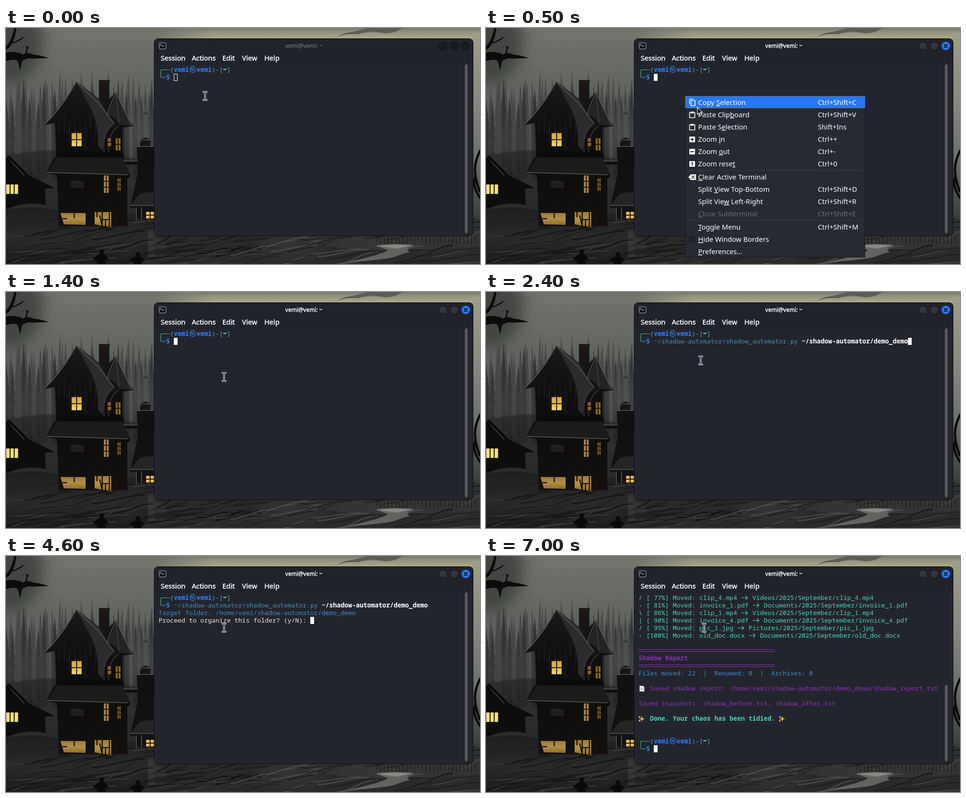
An HTML page that plays this animation: 1000x500 px, repeating every 8 s.

```html
<!DOCTYPE html>
<html lang="en">
<head>
<meta charset="utf-8">
<title>Terminal session</title>
<style>
  html, body { margin: 0; width: 100%; height: 100%; overflow: hidden; background: #222; }
  svg { display: block; width: 1000px; height: 500px; }
  text { white-space: pre; fill: #fff; font: 500 14.67px "Noto Sans", sans-serif; }
  .title { font-size: 12px; text-anchor: middle; }
  .active { stroke: #fff; stroke-width: .4px; }
  .mono { font: 13.333px "Noto Sans Mono", monospace; }
  .bold { font-weight: 700; }
  .teal { fill: #3fb8a0; }
  .mint { fill: #47d4b9; }
  .blue { fill: #277fff; }
  .sky { fill: #3a8fd0; }
  .cmd { fill: #4193b5; }
  .violet { fill: #962ac3; }
  .cream { fill: #eeeade; }
  .off { fill: #6c6e74; }
  .under { text-decoration: underline; }
</style>
</head>
<body>
<svg id="stage" viewBox="0 0 1000 500"></svg>
<script>
const NAME = 'vemi', LOOP = 8000;
const stage = document.getElementById('stage');

let seed = 7;
const rand = (a, b) => {
  seed = (seed * 16807) % 2147483647;
  return a + (b - a) * seed / 2147483647;
};
const repeat = (n, fn) => Array.from({ length: n }, (_, i) => fn(i)).join('');
const rect = (x, y, w, h, fill, extra = '') =>
  `<rect x="${x}" y="${y}" width="${w}" height="${h}" fill="${fill}" ${extra}/>`;
const path = (d, fill, extra = '') => `<path d="${d}" fill="${fill}" ${extra}/>`;
const line = (d, color, width = 1) =>
  path(d, 'none', `stroke="${color}" stroke-width="${width}" stroke-linecap="round"`);
const glow = (x, y, rx, ry, color) =>
  `<ellipse cx="${x}" cy="${y}" rx="${rx}" ry="${ry}" fill="${color}" filter="url(#blur)"/>`;
const label = (x, y, text, cls = '') => `<text x="${x}" y="${y}" class="${cls}">${text}</text>`;
const layer = (from, to, html) => `<g data-from="${from}" data-to="${to}">${html}</g>`;

// ---- Wallpaper ----
const gradient = (id, ...colors) => `<linearGradient id="${id}" x2="0" y2="1">${
  colors.map((c, i) => `<stop offset="${i / (colors.length - 1)}" stop-color="${c}"/>`).join('')}</linearGradient>`;

function pine(x, top, width) {
  let left = '', right = '';
  for (let i = 1; i < 9; i++) {
    const y = top + i * 11, w = width * i / 8;
    right += `L${x + w * rand(.7, 1.1)} ${y}L${x + w * .6} ${y - 2}`;
    left = `L${x - w * .6} ${y - 2}L${x - w * rand(.7, 1.1)} ${y}` + left;
  }
  return `M${x} ${top}${right}V320H${x - width / 2}${left}Z`;
}
const forest = (n, step, low, high, width, fill) =>
  repeat(n, i => path(pine(i * step + rand(-5, 5), rand(low, high), rand(width * .6, width)), fill));

function pane(x, y, w, h, fill = 'url(#lamp)', cols = 2, rows = 2) {
  let bars = '';
  for (let i = 1; i < cols; i++) bars += `M${x + w * i / cols} ${y}v${h}`;
  for (let i = 1; i < rows; i++) bars += `M${x} ${y + h * i / rows}h${w}`;
  return rect(x, y, w, h, fill, 'stroke="#100e0c"') + line(bars, '#17120c', 2);
}

const figure = (x, y) =>
  `<circle cx="${x}" cy="${y}" r="5" fill="#090909"/>` +
  path(`M${x - 4} ${y + 4}Q${x - 12} ${y + 8} ${x - 18} 490L${x - 15} 493L${x - 9} ${y + 17}L${x - 11} 500H${x + 9}` +
       `L${x + 8} ${y + 15}L${x + 12} 494L${x + 14} 491Q${x + 11} ${y + 7} ${x + 4} ${y + 4}Z`, '#090909');

// Long thin roots and grass sweeping up to the right
const roots = (n, x0, x1, colors) => repeat(n, i => {
  const x = rand(x0, x1), y = rand(415, 505), w = rand(40, 120), rise = rand(4, 26);
  return line(`M${x} ${y}C${x + w * .4} ${y - 2} ${x + w * .6} ${y - rise} ${x + w} ${y - rise}`,
    colors[i % colors.length], rand(.6, 2.6));
});

const wallpaper = `<defs>
  ${gradient('air', '#72746d', '#666963', '#545754', '#434645', '#303333', '#272929')}
  ${gradient('far', '#474a47', '#444745', '#353837')}
  ${gradient('near', '#343736', '#313433', '#2a2c2c')}
  ${gradient('soil', '#1d1e1e', '#282929', '#1d1e1e')}
  ${gradient('wood', '#191817', '#0d0c0c', '#121110')}
  ${gradient('lamp', '#d6a52f', '#ffd855')}
  ${gradient('dusk', '#a17a35', '#b98f42', '#8f6a2e')}
  ${gradient('edge', '#a19d86', '#888a81', '#6d6f6a', '#373938')}
  ${gradient('dawn', '#7c7d70', '#99987f', '#b0ab8c')}
  <filter id="blur" x="-1" y="-1" width="3" height="3"><feGaussianBlur stdDeviation="16"/></filter>
  <linearGradient id="veil"><stop stop-color="#6f716a"/><stop offset="1" stop-color="#6f716a" stop-opacity="0"/></linearGradient>
</defs>
${rect(0, 0, 1000, 500, 'url(#air)')}
${rect(300, 0, 700, 24, 'url(#dawn)')}
${rect(300, 0, 140, 24, 'url(#veil)')}
${glow(0, 30, 80, 90, '#3a3d3acc')}
${path('M690 22Q715 11 742 13Q765 5 800 11Q820 12 836 0H760Q745 6 715 11Z', '#5b5d56')}
${rect(984, 10, 16, 400, 'url(#edge)')}
${forest(32, 10, 82, 130, 9, 'url(#far)')}
${forest(20, 17, 105, 165, 12, 'url(#near)')}
${glow(285, 225, 30, 45, '#62656277')}
${glow(55, 240, 50, 35, '#4a4d4c66')}
${path('M0 270Q160 240 320 290V440H0Z', '#222424', 'opacity=".6"')}
${path('M0 52Q20 48 38 57Q46 50 56 56Q72 57 90 64Q70 64 56 65Q44 62 34 70Q33 80 29 90Q28 74 22 68Q12 66 0 70Z', '#0b0b0b')}
${path('M0 38Q12 28 17 0H22Q20 24 8 40L0 47Z', '#0b0b0b')}
${line('M10 32Q24 30 36 20M40 56Q46 48 44 40L47 42', '#0b0b0b', 2.5)}
${path('M290 181l4-2 7 2-5 3Z', '#343734')}
${path('M0 386Q60 371 120 390T250 398Q290 385 330 400V500H0Z', 'url(#soil)')}
${rect(300, 430, 700, 70, '#343534')}
${path('M312 440H620Q670 470 790 470T1000 463V500H250Q390 470 312 440Z', '#292a29')}
${glow(600, 465, 70, 14, '#4a4b4888')}
${roots(110, -40, 480, ['#151616', '#383a39', '#1a1b1b', '#111212'])}
${roots(70, 380, 1000, ['#1b1c1b', '#4b4c49', '#222322'])}
${path('M778 461Q815 456 862 461Q838 467 852 474Q830 481 812 487Q770 494 715 497Q785 482 806 471Q792 465 778 461Z', '#62635f')}
${path('M782 461Q820 456 860 460L829 467Q800 466 782 461Z', '#85867f')}
${line(repeat(27, i => `M${782 + i * 8} ${rand(439, 444)}v${rand(12, 18)}`), '#1b1c1b', 1.4)}
${line('M1000 260Q984 292 992 322T1000 345M990 315Q982 333 1000 360', '#0b0b0b', 5)}

${path('M0 276L8 268L48 307L105 339L82 341L84 375Q40 366 0 384Z', '#0e0d0d')}
${line('M8 269L50 311L103 338M10 282L38 312', '#4b4b47', 1.3)}
${pane(0, 331, 26, 21, '#ffe07a', 3, 1)}
${path('M148 113L196 150V112H218V151L232 135Q247 180 270 208L249 211L249 282H277V289H249L263 314L256 319V420H112L107 311L84 307L99 279L106 272L103 201L80 206Q122 164 148 113Z', 'url(#wood)')}
${rect(196, 110, 23, 6, '#1e1e1c')}
${path('M148 113L196 150L218 190L230 204Q206 215 204 260L194 250Q196 207 180 172Z', '#2b2b29')}
${path('M232 137Q247 180 268 207L240 205Q226 185 213 184Q226 160 232 137Z', '#232321')}
${path('M106 274H246L262 310L86 306Z', '#1c1b1a')}
${line('M148 114Q122 164 82 204M148 114L196 160L228 202M232 137Q219 163 213 184M232 137L265 207M86 306L256 311', '#5b5b55', 1.4)}
${line('M232 142L239 201M221 206Q203 228 207 263M235 208Q213 231 217 262M247 211V265', '#494842', 1.2)}
${line(repeat(8, i => `M${112 + i * 11} ${rand(175, 200)}v${rand(25, 70)}`), '#22201e', 1.5)}
${pane(138, 222, 22, 29)}
${pane(214, 233, 8, 18, '#87622c', 1)}
${pane(231, 233, 11, 27, '#8f672c')}
${pane(206, 312, 11, 38, '#b58d40', 2, 3)}
${pane(235, 318, 7, 27, '#a87c30', 2, 3)}
${rect(138, 325, 25, 12, '#211e1b', 'stroke="#33302b"')}
${path('M115 392H168V417L122 416Z', 'url(#dusk)')}
${path('M187 390H222V422L187 416Z', 'url(#dusk)')}
${line('M144 390v12M116 404h12M192 390v10M198 398l4 17M203 391v30M210 407v14M218 392v28M204 406h14', '#1b150d', 2.6)}
${path('M276 251H283V241H304V250H320V305L278 312Z', '#111010')}
${path('M284 235L295 232L306 237L304 248H286Z', '#171716')}
${line('M284 236L306 238M277 251H312M249 282H278', '#5d5d57', 1.6)}
${path('M278 308L318 286V405H274V381H261Z', '#121211')}
${path('M261 376L284 350L320 346V378Z', '#252523')}
${line('M262 376H312M275 382V407M286 380V405', '#484843', 2)}
${pane(295, 389, 18, 15, '#f2bf48', 2, 2)}
${figure(202, 474)}${figure(278, 480)}
${line('M216 489Q240 497 265 490', '#111110', 1.2)}`;

// ---- Terminal window ----
const buttons = (fill, close, closeEdge) => [922, 946, 970].map((x, i) =>
  `<circle cx="${x}" cy="38" r="8.5" fill="${i == 2 ? close : fill}" stroke="${i == 2 ? closeEdge : '#0c0d10'}"/>`).join('');
const title = (color, cls = '') =>
  `<text x="628.5" y="42" class="title ${cls}" style="fill:${color}">${NAME}@${NAME}: ~</text>`;
const scrollbar = top => rect(968, top, 6, 435 - top, '#55575c', 'rx="3"');

const frame = rect(312.5, 22.5, 673, 418, '#23252e', 'rx="8" stroke="#0d0e11"') +
  path('M313 77V30Q313 23 320 23H978Q985 23 985 30V77Z', '#21232b') +
  rect(323.5, 31.5, 14, 13, '#16181d', 'stroke="#b8babd" rx="1"') +
  line('M326 34l2 2-2 2M330 38h3', '#fff') +
  [['Session', 326.5], ['Actions', 392], ['Edit', 456.5], ['View', 498], ['Help', 545]]
    .map(([text, x]) => label(x, 69, text, 'active')).join('');

// ---- Terminal contents, on an 8 by 16 grid ----
const cell = (col, row, cls, text) => label(322 + col * 8, 93 + row * 16, text, 'mono ' + cls);
const caret = (col, row) => rect(322 + col * 8, 97 + (row - 1) * 16, 8, 15, '#fff');

function prompt(row) {
  const y = 88.5 + row * 16;
  return path(`M346 ${y}H326.5V${y + 16}H338`, 'none', 'stroke="#3fb8a0"') +
    cell(3, row, 'teal', '(') + cell(4, row, 'bold blue', NAME) +
    `<text x="387.3" y="${93 + row * 16}" class="mono blue" style="font-family:'Noto Sans CJK KR','Noto Sans CJK JP',sans-serif">㉿</text>` +
    cell(10, row, 'bold blue', NAME) + cell(14, row, 'teal', ')-[') +
    cell(17, row, 'bold', '~') + cell(18, row, 'teal', ']') + cell(2, row + 1, 'bold blue', '$');
}

function moved(row, spinner, percent, file, folder) {
  const x = 322 + (17 + file.length) * 8, y = 88.5 + row * 16;
  return cell(0, row, 'mint', `${spinner} [${String(percent).padStart(3)}%] Moved: ${file}`) +
    line(`M${x + 1} ${y}h13m-4-4l4 4-4 4`, '#47d4b9', 1.2) +
    cell(20 + file.length, row, 'mint', `${folder}/2025/September/${file}`);
}

const star = (x, y, r) => path(`M${x} ${y - r}Q${x} ${y} ${x + r} ${y}Q${x} ${y} ${x} ${y + r}Q${x} ${y} ${x - r} ${y}Q${x} ${y} ${x} ${y - r}Z`,
  '#ffc83d', 'stroke="#ffc83d" stroke-width=".8"');
const sparkles = x => star(x + 7, 345, 5) + star(x + 2, 341, 2) + star(x + 2, 349, 2);
const rule = row => line(`M322 ${86.5 + row * 16}h287m0 4h-287`, '#962ac3');

const report =
  moved(0, '/', 77, 'clip_4.mp4', 'Videos') +
  moved(1, '-', 81, 'invoice_1.pdf', 'Documents') +
  moved(2, '\\', 86, 'clip_1.mp4', 'Videos') +
  moved(3, '|', 90, 'invoice_4.pdf', 'Documents') +
  moved(4, '/', 95, 'pic_1.jpg', 'Pictures') +
  moved(5, '-', 100, 'old_doc.docx', 'Documents') +
  rule(7) + cell(0, 8, 'bold violet', 'Shadow Report') + rule(9) +
  cell(0, 10, 'sky', 'Files moved: 22  |  Renamed: 0  |  Archives: 0') +
  path('M324 275h7l3 3v9h-10Z', '#edf1f3') + line('M326 279h4m-4 2h6m-6 2h6', '#8b9aa5', .8) +
  cell(3, 12, 'violet', `Saved shadow report: /home/${NAME}/shadow-automator/demo_demo/shadow_report.txt`) +
  cell(0, 14, 'violet', 'Saved snapshots: shadow_before.txt, shadow_after.txt') +
  sparkles(322) + cell(3, 16, 'bold mint', 'Done. Your chaos has been tidied.') + sparkles(618) +
  prompt(19) + caret(4, 20);

// ---- Context menu: label, shortcut, row centre; "_" precedes the underlined letter ----
const items = [
  ['Copy _Selection', 'Ctrl+Shift+C', 158], ['Paste Clip_board', 'Ctrl+Shift+V', 184],
  ['Paste S_election', 'Shift+Ins', 210], ['Zoom _in', 'Ctrl++', 236],
  ['Zoom _out', 'Ctrl+-', 262], ['Zoom rese_t', 'Ctrl+0', 288],
  ['_Clear Active Terminal', '', 316], ['Split _View Top-Bottom', 'Ctrl+Shift+D', 342],
  ['Split Vie_w Left-Right', 'Ctrl+Shift+R', 368], ['_Close Subterminal', 'Ctrl+Shift+E', 394],
  ['_Toggle Menu', 'Ctrl+Shift+M', 422], ['_Hide Window Borders', '', 448], ['_Preferences...', '', 474]
];
const clipboard = y => path(`M429.5 ${y - 5}h11v11h-11Z`, 'none', 'stroke="#fff" stroke-width="1.6"') +
  rect(432, y - 7, 6, 4, '#fff');
const badge = (y, mark) => rect(429, y - 6, 12, 12, '#fff', 'rx="1"') + line(mark, '#262932', 1.8);
const menu = rect(420.5, 144.5, 379, 341, '#272a33', 'stroke="#14161b"') +
  rect(420.5, 144.5, 379, 25, '#2777ff', 'id="highlight" stroke="#d88800" stroke-dasharray="1 1"') +
  line('M426 301.5H794M426 407.5H794', '#3b3e46') +
  path('M432.5 153.5h8.5v11h-8.5ZM429.5 161V150.5h8', 'none', 'stroke="#fff" stroke-width="1.6"') +
  clipboard(184) + clipboard(210) +
  badge(236, 'M432 236h6m-3-3v6') + badge(262, 'M432 262h6') + badge(288, 'M434 286l1.5-1v6') +
  path('M427 316l5-6h11v12h-11Z', '#fff') + line('M434 313l6 6m0-6l-6 6', '#262932', 1.6) +
  rect(428.5, 441.5, 12, 12, '#20222a', 'stroke="#17191e"') +
  items.map(([text, keys, y]) => {
    const cls = y == 394 ? 'off' : '';
    return label(447.5, y + 5, text.replace(/_(.)/, '<tspan class="under">$1</tspan>'), cls) + label(700, y + 5, keys, cls);
  }).join('');

// ---- Pointer ----
const beamShape = 'M-3.5-8.5H-1L0-7.5 1-8.5H3.5M0-7.5V7.5M-3.5 8.5H-1L0 7.5 1 8.5H3.5';
const beam = line(beamShape, '#fff', 3.2) + line(beamShape, '#111', 1.2);
const arrow = path('M0 0V15L3.5 12L6 18L8.7 17L6.2 11H11Z', '#111', 'stroke="#fff" stroke-width="1.1"');
const track = [
  [0, 420, 144], [200, 420, 144], [500, 446, 168], [900, 485, 196], [1000, 460, 180],
  [1700, 460, 180], [2400, 453, 145], [3400, 453, 145], [3500, 451, 146], [3600, 459, 147],
  [3700, 457, 147], [3900, 457, 147], [4000, 459, 152], [4100, 458, 150],
  [4400, 458, 150], [4600, 460, 152], [LOOP, 460, 152]
];
function pointerAt(t) {
  const i = track.findIndex(key => key[0] > t);
  const [t0, x0, y0] = track[i - 1], [t1, x1, y1] = track[i];
  const k = (t - t0) / (t1 - t0);
  return [Math.round(x0 + (x1 - x0) * k), Math.round(y0 + (y1 - y0) * k)];
}

stage.innerHTML = wallpaper + frame +
  layer(0, 100, title('#85878c') + buttons('#1a1b20', '#1a1b20', '#0c0d10') +
    rect(354.5, 97.5, 7, 14, 'none', 'stroke="#fff"')) +
  layer(100, LOOP, title('#fff', 'active') + buttons('#30353f', '#2777ff', '#2777ff') +
    line('M967 35l6 6m0-6l-6 6', '#0b0d12', 2)) +
  layer(0, 7000, prompt(0) + scrollbar(77)) +
  layer(100, 1500, caret(4, 1)) +
  layer(1500, 7000, cell(4, 1, 'cmd', '~/shadow-automator/shadow_automator.py') +
    cell(43, 1, 'bold', '~/shadow-automator/demo_demo')) +
  layer(1500, 3100, caret(71, 1)) +
  layer(3100, 7000, cell(0, 2, 'sky', `Target folder: /home/${NAME}/shadow-automator/demo_demo`) +
    cell(0, 3, 'cream', 'Proceed to organize this folder? (y/N): ')) +
  layer(3100, 5900, caret(40, 3)) +
  layer(5900, 7000, cell(40, 3, 'cream', 'y') + caret(41, 3)) +
  layer(7000, LOOP, report + scrollbar(273)) +
  layer(200, 1400, menu) +
  `<g id="pointer">${layer(0, 200, beam)}${layer(200, 1400, arrow)}${layer(1400, LOOP, beam)}</g>`;

const layers = [...stage.querySelectorAll('[data-from]')];
const pointer = document.getElementById('pointer');
const highlight = document.getElementById('highlight');

function draw() {
  const t = Math.floor(performance.now() % LOOP / 100) * 100;
  for (const g of layers) g.style.display = t >= +g.dataset.from && t < +g.dataset.to ? '' : 'none';
  const [x, y] = pointerAt(t);
  pointer.setAttribute('transform', `translate(${x} ${y})`);
  highlight.setAttribute('y', y < 170 ? 144.5 : 170.5);
  highlight.style.display = y < 145 ? 'none' : '';
  requestAnimationFrame(draw);
}
draw();
</script>
</body>
</html>
```
